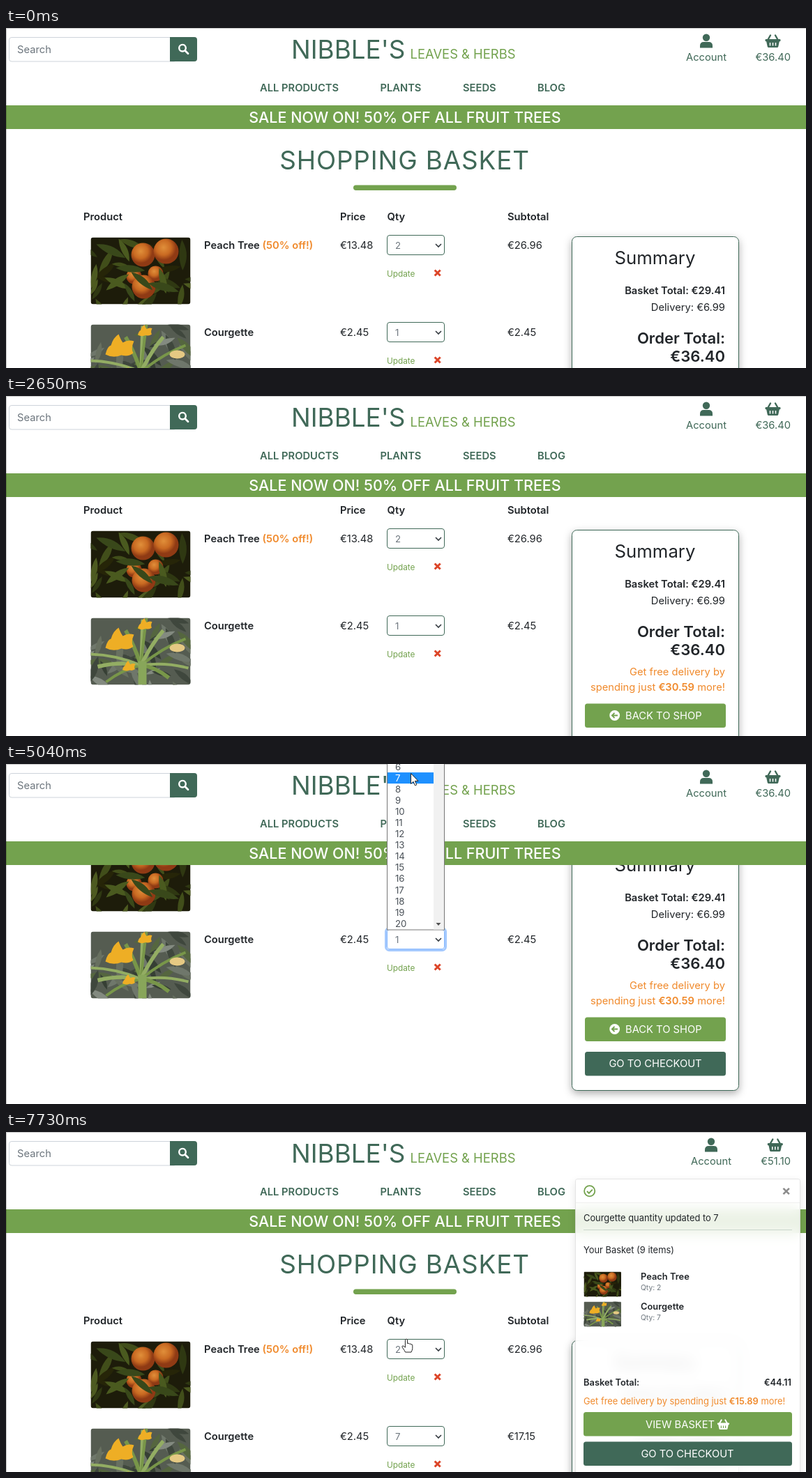
Recreate the animation shown at these times as an HTML page. Size 1147 by 488 pixels, loop 8000 ms.

```html
<!DOCTYPE html>
<html lang="en">
<head>
<meta charset="utf-8">
<title>Shopping basket</title>
<style>
  html, body { margin: 0; width: 100%; height: 100%; overflow: hidden; background: #fff; }
  body { position: relative; }
  svg { position: absolute; left: 0; top: 0; display: block; }
  text { font-family: Inter, sans-serif; font-optical-sizing: none; white-space: pre; }
  #toast {
    position: absolute; left: 816px; top: 67px; width: 321px; height: 440px;
    border: 1px solid rgba(0,0,0,.1); border-radius: 4px; background: rgba(255,255,255,.85);
    box-shadow: 0 4px 12px rgba(0,0,0,.1); backdrop-filter: blur(10px); overflow: hidden;
  }
</style>
</head>
<body>
<svg id="page" width="1147" height="488"></svg>
<div id="toast"><svg id="toastArt" width="322" height="440" viewBox="817 68 322 440"></svg></div>
<svg id="pointer" width="1147" height="488"></svg>
<script>
const LOOP = 8000, REM = 14.72;
const DARK = '#406958', GREEN = '#73a24e', INK = '#212529', GREY = '#6c757d', ORANGE = '#f08a2c', RED = '#dc4528';
const $ = id => document.getElementById(id);

// Text placed by the middle of its capital height.
const text = (x, y, s, { size = REM, fill = INK, weight = 400, anchor = 'start', id = '', extra = '' } = {}) =>
  `<text ${id && `id="${id}"`} x="${x}" y="${y + size * .36}" font-size="${size}" fill="${fill}"
    font-weight="${weight}" text-anchor="${anchor}" ${extra}>${s}</text>`;
const box = (x, y, w, h, fill, more = '') =>
  `<rect x="${x}" y="${y}" width="${w}" height="${h}" fill="${fill}" ${more}/>`;
const line = (d, stroke, width, more = '') =>
  `<path d="${d}" fill="none" stroke="${stroke}" stroke-width="${width}" ${more}/>`;
const bold = s => `<tspan font-weight="600">${s}</tspan>`;
const range = n => [...Array(n).keys()];

function seeded(seed) {
  return () => (seed = (seed * 16807) % 2147483647) / 2147483647;
}
const leaf = (x, y, angle, len, fill) =>
  `<path transform="translate(${x} ${y}) rotate(${angle})" fill="${fill}"
    d="M0 0Q${len / 2} ${-len / 3.5} ${len} 0Q${len / 2} ${len / 5} 0 0"/>`;
function foliage(seed, count, fills) {
  const rnd = seeded(seed);
  return range(count).map(i =>
    leaf(rnd() * 150 - 15, rnd() * 100, rnd() * 180, 22 + rnd() * 22, fills[i % fills.length])).join('');
}

function peachPhoto() {
  const fruit = [[93, 52, 11], [62, 56, 11], [76, 71, 17], [75, 25, 17], [108, 20, 18]];
  const leaves = [[36, 44, 5, 42], [22, 76, -35, 40], [58, 50, 40, 40], [98, 44, 75, 38],
    [8, 10, 25, 46], [40, 2, 65, 36], [82, 66, 15, 46], [20, 58, 25, 38], [48, 66, 60, 30]];
  return box(0, 0, 143, 96, '#1d1c0a') +
    foliage(77, 30, ['#2f3812', '#414e1a', '#262508', '#4d5a20']) +
    fruit.map(([x, y, r]) => `<circle cx="${x}" cy="${y}" r="${r}" fill="url(#skin)"/>`).join('') +
    leaves.map(([x, y, a, l], i) => leaf(x, y, a, l, i % 2 ? '#4a5a1f' : '#39481a')).join('');
}
function courgettePhoto() {
  const stems = [[10, 70], [22, 92], [0, 52], [50, 18], [74, 2], [80, 0], [104, 18], [136, 30], [140, 72], [112, 86]];
  const flower = (x, y, s) => `<path transform="translate(${x} ${y}) scale(${s})" fill="#eeae25"
    d="M-19 10Q-16-2-11-3-8-14 0-19 3-11 6-7 14-12 22-9 17 2 21 8 14 14 4 11-8 16-19 10Z"/>`;
  return box(0, 0, 143, 96, '#555c51') +
    foliage(31, 44, ['#6f776b', '#3f473d', '#838a80', '#55663f', '#363f34', '#687060']) +
    stems.map(([x, y], i) => line(`M72 68Q${(72 + x) / 2} ${(68 + y) / 2 - 7} ${x} ${y}`,
      i % 2 ? '#789649' : '#93ad63', i % 3 ? 4 : 5.5)).join('') +
    line('M74 96V62', '#88a65a', 12) +
    flower(40, 33, 1) + flower(77, 10, .5) + flower(54, 70, .45) +
    '<ellipse cx="124" cy="43" rx="11" ry="6" fill="#e5c983"/>';
}

const basketIcon = (x, y, fill, gap, s = 1) => `<g transform="translate(${x} ${y}) scale(${s})">
  ${line('M-7.5-1L-3.5-8M7.5-1L3.5-8', fill, 2.4, 'stroke-linecap="round"')}
  ${box(-11, -2.5, 22, 3.2, fill, 'rx="1.2"')}
  <path fill="${fill}" d="M-9.5 0H9.5L7.8 8Q7.5 9.5 6 9.5H-6Q-7.5 9.5-7.8 8Z"/>
  ${line('M-4 2.5V7M0 2.5V7M4 2.5V7', gap, 1.5)}</g>`;
const cross = (x, y, fill, r = 4, w = 3) =>
  line(`M${x - r} ${y - r}l${2 * r} ${2 * r}m0 ${-2 * r}l${-2 * r} ${2 * r}`, fill, w);

function productRow(y, key, name, price, qty, subtotal) {
  return `<use href="#${key}" x="121.5" y="${y}" width="143" height="96"/>` +
    text(284, y + 11, name, { weight: 600 }) + text(479, y + 11, price) +
    box(546.5, y - 3, 82, 28, '#fff', `id="${key}Box" rx="3.5" stroke="${DARK}"`) +
    text(558, y + 11.5, qty, { size: 13.2, fill: GREY, id: key + 'Qty' }) +
    line(`M616 ${y + 9.5}l4 4 4-4`, '#343a40', 1.6) +
    text(719, y + 11, subtotal, { id: key + 'Sub' }) +
    text(546, y + 52.5, 'Update', { size: 11.8, fill: GREEN }) + cross(618.7, y + 51, RED);
}
const button = (x, y, w, fill) => box(x, y, w, 34.5, fill, 'rx="3.5"');

function summary() {
  const end = { anchor: 'end' };
  return box(811.5, 299.5, 239, 184 + 170, '#fff',
      `rx="7" stroke="${DARK}" style="filter:drop-shadow(0 4px 6px rgba(0,0,0,.32))"`) +
    text(930.5, 330, 'Summary', { size: 25.76, anchor: 'middle' }) +
    text(1031, 376.5, 'Basket Total: €29.41', { ...end, weight: 600 }) +
    text(1031, 401, 'Delivery: €6.99', end) +
    text(1031, 445, 'Order Total:', { ...end, size: 22.08, weight: 600 }) +
    text(1031, 471, '€36.40', { ...end, size: 22.08, weight: 600 }) +
    text(1031, 503, 'Get free delivery by', { ...end, fill: ORANGE }) +
    text(1031, 525, `spending just ${bold('€30.59')} more!`, { ...end, fill: ORANGE }) +
    button(830, 548.5, 202, GREEN) + '<circle cx="872.7" cy="565.5" r="7.4" fill="#fff"/>' +
    line('M877 565.5h-8m3.5-3.6l-3.6 3.6 3.6 3.6', GREEN, 1.9) +
    text(888, 565.5, 'BACK TO SHOP', { fill: '#fff' }) +
    button(830, 598, 202, DARK) + text(931, 615, 'GO TO CHECKOUT', { fill: '#fff', anchor: 'middle' });
}

function header() {
  const nav = [[364, 'ALL PRODUCTS'], [536.5, 'PLANTS'], [655, 'SEEDS'], [762, 'BLOG']];
  return box(0, 0, 1147, 111, '#fff') + box(0, 111, 1147, 34, GREEN) +
    box(4.5, 13.5, 240, 34.5, '#fff', 'rx="3.5" stroke="#ced4da"') +
    text(16, 31, 'Search', { fill: GREY }) +
    `<path fill="${DARK}" d="M235 13H270q4 0 4 4V44q0 4-4 4H235Z"/>
     <circle cx="253" cy="28.7" r="4.8" fill="none" stroke="#fff" stroke-width="2.4"/>` +
    line('M256.5 32.2l4.5 4.5', '#fff', 2.8, 'stroke-linecap="round"') +
    text(409, 31, "NIBBLE'S", { size: 36.8, fill: DARK }) +
    text(579.5, 37.5, 'LEAVES &amp; HERBS', { size: 18.4, fill: GREEN }) +
    nav.map(([x, s]) => text(x, 86, s, { fill: DARK, weight: 600 })).join('') +
    text(572, 128.5, 'SALE NOW ON! 50% OFF ALL FRUIT TREES',
      { size: 21.5, weight: 500, fill: '#fff', anchor: 'middle' }) +
    `<g id="account"><circle cx="1004" cy="13.7" r="5.2" fill="${DARK}"/>
      <path fill="${DARK}" d="M995 28.5V25.5q0-5.5 5.5-5.5h7q5.5 0 5.5 5.5v3Z"/>
      ${text(1004, 42, 'Account', { fill: DARK, anchor: 'middle' })}</g>
     <g id="basket">${basketIcon(1099.5, 18.5, DARK, '#fff')}</g>` +
    text(1125, 42, '€36.40', { fill: DARK, anchor: 'end', id: 'total' }) +
    line('M.5 488V.5H1147', 'rgba(0,0,0,.22)', 1);
}

const ROW = 16.07;
const optionY = n => 229 - (20 - n) * ROW;
const options = () => box(546.5, -20, 82, 258, '#fff', 'stroke="#767676"') +
  box(613, -20, 15, 257.5, '#f1f1f1') + '<path d="M616.5 228h7l-3.5 4Z" fill="#505050"/>' +
  box(547, 0, 66, 16, '#1e90ff', 'id="hot"') +
  range(15).map(i => text(558, optionY(i + 6), i + 6, { size: 13.2, fill: '#495057', id: 'opt' + (i + 6) })).join('');

function toast() {
  const s = 12.88;
  const item = (y, key, name, qty) =>
    `<use href="#${key}" x="828.5" y="${y}" width="53.5" height="35.9"/>` +
    text(910, y + 6.5, name, { size: s, weight: 600 }) + text(910, y + 23, qty, { size: 10.3, fill: GREY });
  return box(817, 68, 322, 33.5, 'rgba(255,255,255,.85)') + line('M817 101.5h322', 'rgba(0,0,0,.06)', 1) +
    `<circle cx="836.7" cy="84.7" r="7.6" fill="none" stroke="${GREEN}" stroke-width="1.8"/>` +
    line('M833 85l2.8 2.8 5-5.2', GREEN, 1.9) + cross(1118.7, 85, '#8c8c8c', 4.2, 2.6) +
    text(828, 123.5, 'Courgette quantity updated to 7', { size: s }) +
    line('M828 140.5h299', 'rgba(64,105,88,.22)', 1) +
    text(828, 169.5, 'Your Basket (9 items)', { size: s }) +
    item(200.5, 'peach', 'Peach Tree', 'Qty: 2') + item(243.5, 'courgette', 'Courgette', 'Qty: 7') +
    text(828, 359.5, 'Basket Total:', { size: s, weight: 600 }) +
    text(1126, 359.5, '€44.11', { size: s, weight: 600, anchor: 'end' }) +
    text(828, 386, `Get free delivery by spending just ${bold('€15.89')} more!`, { size: s, fill: ORANGE }) +
    button(828, 402, 299, GREEN) + text(917, 419.5, 'VIEW BASKET', { fill: '#fff' }) +
    basketIcon(1028.5, 419.5, '#fff', GREEN, .78) +
    button(828, 444.5, 299, DARK) + text(977, 461.5, 'GO TO CHECKOUT', { fill: '#fff', anchor: 'middle' });
}

const symbol = (id, art) =>
  `<symbol id="${id}" viewBox="0 0 143 96"><g clip-path="url(#round)">${art}</g></symbol>`;
$('page').innerHTML = `<defs>
    <clipPath id="round"><rect width="143" height="96" rx="4"/></clipPath>
    <radialGradient id="skin" cx=".4" cy=".35"><stop stop-color="#e08f3a"/>
      <stop offset=".6" stop-color="#c96a22"/><stop offset="1" stop-color="#8f3a14"/></radialGradient>
    ${symbol('peach', peachPhoto())}${symbol('courgette', courgettePhoto())}
  </defs>
  <g id="content">` +
  text(571.5, 189.5, 'SHOPPING BASKET', { size: 36.8, fill: DARK, anchor: 'middle', extra: 'letter-spacing=".9"' }) +
  box(498, 225.5, 148, 7.5, GREEN, 'rx="3.7"') +
  [[111, 'Product'], [479, 'Price'], [546.5, 'Qty'], [719, 'Subtotal']]
    .map(([x, s]) => text(x, 270.5, s, { weight: 600 })).join('') +
  productRow(300.5, 'peach', `Peach Tree <tspan fill="${ORANGE}">(50% off!)</tspan>`, '€13.48', 2, '€26.96') +
  box(544.5, 420.5, 86, 32, 'none', 'id="ring" rx="5" stroke="#86b7fe" stroke-opacity=".75" stroke-width="3"') +
  productRow(425.5, 'courgette', 'Courgette', '€2.45', 1, '€2.45') +
  summary() + `</g>${header()}<g id="list">${options()}</g>`;
$('toastArt').innerHTML = toast();
const outline = 'fill="#fff" stroke="#222" stroke-linejoin="round"';
$('pointer').innerHTML =
  `<path id="arrow" ${outline} d="M.5.5V15.5L4 12.3 6.4 17.8 8.8 16.8 6.4 11.4H11Z"/>
   <path id="hand" ${outline} d="M-1.6 1.2Q0-1.2 1.6 1.2V6.6Q3.4 5.4 4.4 7.2 6 6.2 7 8 8.8 7.4 8.8 9.6V13.5Q8.6 16 7 19H-1.5Q-2.5 16.5-4.5 14L-6.2 11.2Q-5.8 9-3.6 10.4L-1.6 12.2Z"/>`;

// Pointer tip: time, x, y.
const PATH = [[0, 988, 500], [330, 988, 500], [390, 989, 476], [760, 1052, 310], [1140, 1096, 170],
  [1200, 1132, 144], [1265, 1162, 130], [3000, 1162, 130], [3001, 1162, 335], [3060, 1149, 330],
  [3250, 850, 300], [3480, 618, 267], [3900, 614, 251], [4330, 614, 251], [4420, 611, 240],
  [4860, 586, 45], [5030, 580, 13], [5290, 580, 13], [5300, 579, 13], [5440, 579, 13], [5590, 575, 17],
  [5990, 575, 17], [6120, 576, 40], [6480, 575, 255], [6630, 574, 300], [6710, 574, 297], [LOOP, 574, 297]];
const clamp = v => Math.max(0, Math.min(1, v));
const ramp = (t, a, b) => clamp((t - a) / (b - a));

function pointerAt(t) {
  const i = Math.max(1, PATH.findIndex(p => p[0] > t));
  const [t0, x0, y0] = PATH[i - 1], [t1, x1, y1] = PATH[i];
  const u = ramp(t, t0, t1);
  return [x0 + (x1 - x0) * u, y0 + (y1 - y0) * u];
}
function scrollAt(t) {
  if (t < 1880 || t >= 7520) return 0;
  const stepped = 1880 + 69.06 * Math.floor((t - 1880) / 69.06 + .15);
  const u = ramp(stepped, 1805, 3200) ** 1.16;
  return Math.round(185 * u * u * (3 - 2 * u));
}

function render(t) {
  const reloaded = t >= 7520, [x, y] = pointerAt(t);
  $('content').setAttribute('transform', `translate(0 ${-scrollAt(t)})`);
  const focus = ramp(t, 3880, 4060) * (1 - ramp(t, 7030, 7180));
  $('ring').setAttribute('opacity', focus);
  $('courgetteBox').setAttribute('stroke', focus > .5 ? '#86b7fe' : DARK);

  const open = t >= 3950 && t < 6000;
  $('list').setAttribute('visibility', open ? 'visible' : 'hidden');
  const hot = y < 237 && x < 613 ? 20 - Math.round((229 - y) / ROW) : 1;
  $('hot').setAttribute('y', optionY(hot) - 8);
  for (let n = 6; n <= 20; n++) $('opt' + n).setAttribute('fill', n === hot ? '#fff' : '#495057');

  $('courgetteQty').textContent = t >= 6000 ? 7 : 1;
  $('courgetteSub').textContent = reloaded ? '€17.15' : '€2.45';
  $('total').textContent = reloaded ? '€51.10' : '€36.40';
  $('account').setAttribute('transform', `translate(${reloaded ? 7 : 0} 0)`);
  $('basket').setAttribute('transform', `translate(${reloaded ? 3.3 : 0} 0)`);
  $('toast').style.opacity = ramp(t, 7520, 7720);
  $('toast').style.visibility = reloaded ? 'visible' : 'hidden';

  const pointing = t > 6400 && y > 285;
  $('arrow').setAttribute('visibility', pointing ? 'hidden' : 'visible');
  $('hand').setAttribute('visibility', pointing ? 'visible' : 'hidden');
  for (const id of ['arrow', 'hand'])
    $(id).setAttribute('transform', `translate(${Math.round(x)} ${Math.round(y)})`);
}
function tick() {
  render(performance.now() % LOOP);
  requestAnimationFrame(tick);
}
tick();
</script>
</body>
</html>
```
